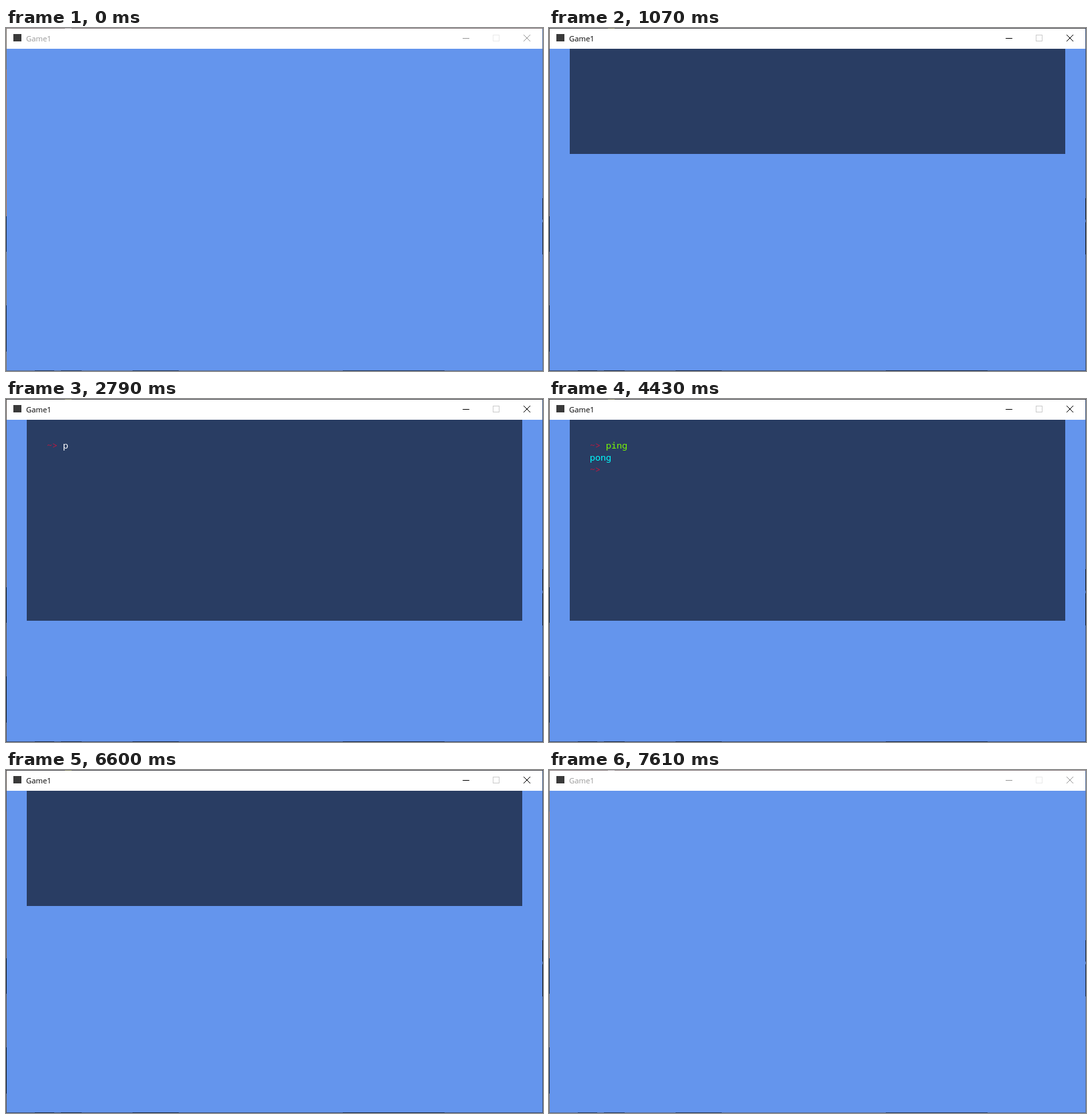
Recreate the animation shown at these times as an HTML page with a canvas. Size 802 px wide and 512 px high, loop 7690 ms.

```html
<!DOCTYPE html>
<html lang="en">
<head>
<meta charset="utf-8">
<title>Game1</title>
<style>
  html, body { margin: 0; width: 100%; height: 100%; overflow: hidden; }
  canvas { display: block; }
</style>
</head>
<body>
<canvas id="stage" width="802" height="512"></canvas>
<script>
const LOOP = 7690, FULL = 300, LEFT = 61, CHAR = 8, LINE = 18;
const ctx = document.getElementById('stage').getContext('2d');

// Moments at which the sliding panel is redrawn
const SLIDE = [0, 920, 1000, 1070, 1150, 1230, 1300,
               6450, 6530, 6600, 6680, 6760, 6830, 6910, 7060];
const BLINK = [1470, 2000, 2470, 2960, 3480, 3950, 4430, 4980, 5440, 5990, 6450];
const TYPED = [[2170, ''], [2790, 'p'], [3110, 'pi'], [3340, 'pin'], [3490, 'ping']];
const ENTER = 4130;

function rect(color, x, y, w, h) {
  ctx.fillStyle = color;
  ctx.fillRect(x, y, w, h);
}

function write(text, color, x, y) {
  ctx.fillStyle = color;
  ctx.fillText(text, x, y);
}

function smooth(u) {
  u = Math.min(1, Math.max(0, u));
  return u * u * (3 - 2 * u);
}

function panelHeight(time) {
  const t = SLIDE.filter(s => s <= time).pop();
  if (t < 6450) return Math.round(FULL * smooth((t - 857) / 413));
  const h = Math.round(FULL * (1 - smooth((t - 6416) / 409)));
  return t < 7060 ? Math.max(1, h) : 0;
}

function drawConsole(t) {
  const h = panelHeight(t);
  if (!h) return;
  rect('#293d63', 31, 31, 740, h);

  ctx.font = '13.33px "Noto Sans Mono", monospace';
  const top = 74 + h - FULL;
  const prompt = row => write('~>', '#c4183f', LEFT, top + row * LINE);
  const inputX = LEFT + 3 * CHAR;
  let row = 0, input = '';

  prompt(0);
  if (t < ENTER) {
    input = '`';
    for (const [at, text] of TYPED) if (t >= at) input = text;
    write(input, '#fff', inputX, top);
  } else {
    row = 2;
    write('ping', '#7cfc00', inputX, top);
    write('pong', '#00ffff', LEFT, top + LINE);
    prompt(2);
  }

  const cursorOn = BLINK.filter(b => b <= t).length % 2 === 0;
  if (cursorOn) {
    rect('#b8434e', inputX + input.length * CHAR + 0.4, top + row * LINE + 1.2, 8.2, 1.4);
  }
}

function drawTitleBar(active) {
  const ink = active ? '#000' : '#999';
  rect('#fff', 1, 1, 800, 30);
  rect('#3a3a3a', 11, 9, 12, 11);
  ctx.font = '11.3px "Open Sans", sans-serif';
  write('Game1', ink, 30, 20);

  rect(ink, 682, 15, 10, 1);
  ctx.lineWidth = 1;
  ctx.strokeStyle = active ? '#ccc' : '#ebebeb';
  ctx.strokeRect(727.5, 10.5, 9, 9);
  ctx.strokeStyle = ink;
  ctx.beginPath();
  ctx.moveTo(773, 10);
  ctx.lineTo(783, 20);
  ctx.moveTo(783, 10);
  ctx.lineTo(773, 20);
  ctx.stroke();
}

// One-pixel translucent frame with the desktop showing through
function drawBorder(active) {
  const dark = active ? '#10151c' : '#1d2b40';
  rect(active ? '#4a4a4e' : '#857a7c', 0, 0, 802, 1);
  rect(active ? '#77775a' : '#b5b0b4', 88, 0, 10, 1);
  rect(active ? '#5f5652' : '#7d756f', 0, 1, 1, 511);
  rect(active ? '#70594a' : '#b07c58', 0, 62, 1, 219);
  rect(dark, 0, 281, 1, 53);
  rect(dark, 0, 414, 1, 69);
  rect(active ? '#3f567f' : '#59739f', 801, 1, 1, 511);
  rect(dark, 801, 254, 1, 32);
  rect(dark, 801, 290, 1, 48);
  rect(active ? '#3f5277' : '#596e94', 0, 511, 802, 1);
  for (const [x, w] of [[43, 29], [82, 31], [189, 69], [503, 152]]) {
    rect(active ? '#1d2a42' : '#2a3c5c', x, 511, w, 1);
  }
}

function draw(now) {
  const t = now % LOOP;
  const active = t >= 460 && t < 7610;
  rect('#6495ed', 0, 0, 802, 512);
  drawConsole(t);
  drawTitleBar(active);
  drawBorder(active);
  requestAnimationFrame(draw);
}

draw(performance.now());
</script>
</body>
</html>
```
